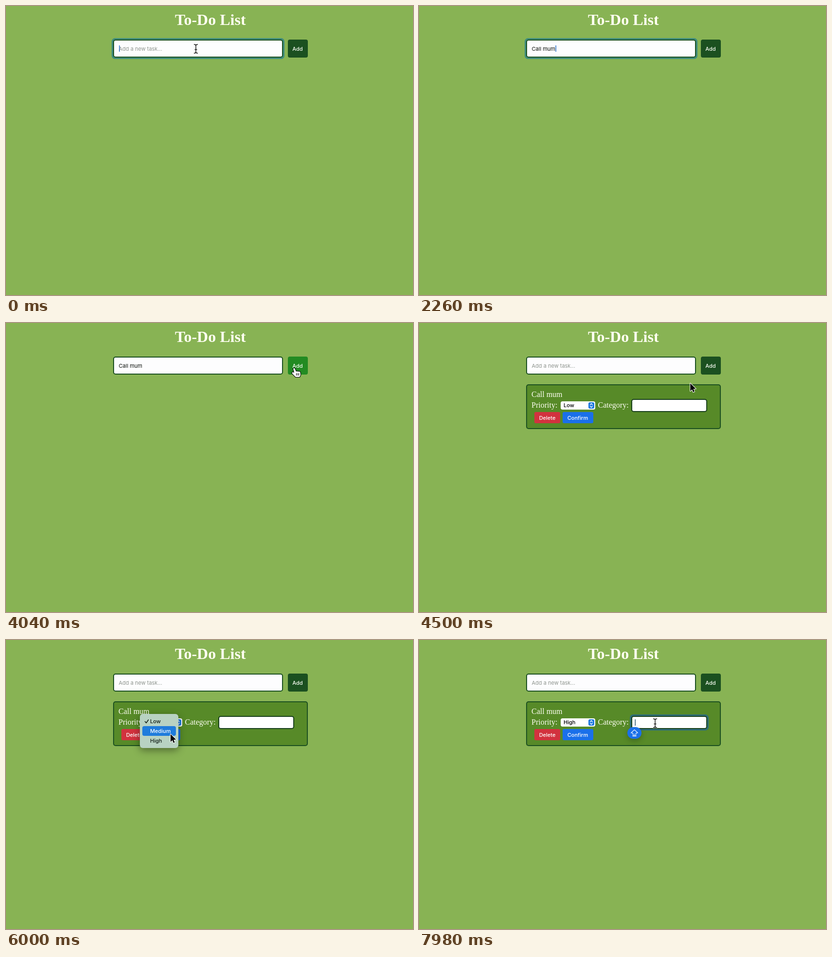
These frames come from a looping animation (836 by 594 pixels, 8 s). An HTML page with a canvas:

```html
<!DOCTYPE html>
<html lang="en">
<head>
<meta charset="utf-8">
<title>To-Do List</title>
<style>
  html, body { margin: 0; width: 100%; height: 100%; overflow: hidden; background: #88b354; }
  canvas { display: block; }
</style>
</head>
<body>
<canvas id="stage" width="836" height="594"></canvas>
<script>
const c = document.getElementById('stage').getContext('2d');
const LOOP = 8000;
const UI = '11px Inter, sans-serif', BOLDER = '500 ' + UI;
const SERIF = '16px "Liberation Serif", serif';
const DARK = '#1b5020', CREAM = '#fffff4', BLUE = '#1a70ea';

// Moments of the interaction, in ms
const KEYS = [820, 980, 1180, 1340, 1560, 1760, 1920, 2100];
const BLUR = 3960, ADDED = 4055, OPEN = 5400, PICK = 7360, FOCUS = 7800, BADGE = 7850;

// Pointer stops: time, x, y
const PATH = [
  [0, 390, 88], [2700, 390, 88], [3150, 547, 114.5], [3300, 547, 114.5],
  [3800, 592, 94], [4200, 592, 94], [4340, 585, 118], [5100, 345, 170],
  [5500, 345, 170], [5950, 338, 193.5], [6400, 338, 193.5], [6750, 335, 207],
  [7420, 335, 207], [7700, 485, 171], [LOOP, 485, 171]
];

function box(x, y, w, h, r, fill, border, line = 2) {
  c.beginPath();
  c.roundRect(x, y, w, h, r);
  c.fillStyle = border || fill;
  c.fill();
  if (border) box(x + line, y + line, w - 2 * line, h - 2 * line, Math.max(r - line, 1), fill);
}

function text(s, x, y, color, font = UI, align = 'left') {
  c.font = font;
  c.textAlign = align;
  c.fillStyle = color;
  c.fillText(s, x, y);
}

function draw(d, x, y, fill, stroke, width) {
  const p = new Path2D(d);
  c.save();
  c.translate(x, y);
  c.lineJoin = c.lineCap = 'round';
  if (stroke) { c.strokeStyle = stroke; c.lineWidth = width; c.stroke(p); }
  if (fill) { c.fillStyle = fill; c.fill(p); }
  c.restore();
}

function shadowed(blur, dy, alpha, paint) {
  c.save();
  c.shadowColor = `rgba(0,0,0,${alpha})`;
  c.shadowBlur = blur;
  c.shadowOffsetY = dy;
  paint();
  c.restore();
}

function pointer(t) {
  const i = PATH.findIndex(p => p[0] > t);
  const [t0, x0, y0] = PATH[i - 1], [t1, x1, y1] = PATH[i];
  const u = (t - t0) / (t1 - t0), e = u * u * (3 - 2 * u);
  return [x0 + (x1 - x0) * e, y0 + (y1 - y0) * e];
}

const inside = (x, y, l, top, r, b) => x > l && x < r && y > top && y < b;
const blink = age => Math.floor(age / 530) % 2 === 0;

function caret(x, y, color) {
  c.fillStyle = color;
  c.fillRect(x, y, 1.5, 13);
}

// Caps lock badge below the caret
function badge(x, y, age, left) {
  const s = Math.min(1, age / 90, left / 90);
  if (s <= 0) return;
  c.save();
  c.translate(x, y);
  c.scale(s, s);
  shadowed(12, 4, .25, () => box(-14.5, -12, 29, 24, 12, BLUE));
  draw('M0-6.5L7 0H3.5V3H-3.5V0H-7ZM-3.5 5.5H3.5V6.5H-3.5Z', 0, 0, null, '#eef5ff', 1.1);
  c.restore();
}

function drawForm(t, x, y) {
  text('To-Do List', 419.8, 39, '#fffff0', 'bold 32px "Liberation Serif", serif', 'center');
  const focused = t < BLUR;
  if (focused) box(217, 66, 355, 43, 7, '#3f8c7c');
  box(220, 69, 349, 37, 5, '#fdfdfe', DARK);

  const typed = t < ADDED ? KEYS.filter(k => k <= t).length : 0;
  const value = 'Call mum'.slice(0, typed);
  text(value || 'Add a new task...', 231.5, 92, value ? '#0a0f0a' : '#8f958f');
  if (focused && blink(t - (typed ? KEYS[typed - 1] : 0)))
    caret(232 + (typed ? c.measureText(value).width : .3), 81, '#2a70c8');

  const hover = inside(x, y, 579, 69, 620, 106);
  box(579, 69, 41, 37, 4, hover ? '#228b22' : DARK);
  text('Add', 599, 92, '#fafff5', BOLDER, 'center');
}

function drawCard(t) {
  box(220, 126, 400, 92, 5, '#578a28', DARK);
  text('Call mum', 231, 152, CREAM, SERIF);
  text('Priority:', 231, 174, CREAM, SERIF);
  text('Category:', 367.5, 174, CREAM, SERIF);

  box(291, 161, 71, 17, 4, '#fff');
  text(t < PICK ? 'Low' : 'High', 297, 173, '#000', BOLDER);
  box(348, 163, 12, 13, 3, '#1f7ae0');
  draw('M-2.2-1.5L0-4L2.2-1.5M-2.2 1.5L0 4L2.2 1.5', 354, 169.5, null, '#fff', 1.2);

  if (t >= FOCUS) box(433, 153, 162, 33, 7, '#2f6e78');
  box(436, 156, 156, 27, 5, '#fff', '#173f1b');
  if (t >= FOCUS) caret(443.5, 163, '#2c5570');

  box(237, 183, 53, 23, 3, '#d2323e');
  text('Delete', 263.5, 199, '#fff', BOLDER, 'center');
  box(295, 183, 63, 23, 3, BLUE);
  text('Confirm', 326, 199, '#fff', BOLDER, 'center');
}

function drawMenu(y) {
  shadowed(16, 5, .4, () => box(275, 152, 79, 70, 6, '#b8d2c2'));
  const active = y < 177 ? 0 : y < 197 ? 1 : 2;
  box(280, 157 + active * 20, 69, 20, 4, '#1f7cdc');
  ['Low', 'Medium', 'High'].forEach((s, i) =>
    text(s, 296, 171 + i * 20, i === active ? '#fff' : '#101c14', BOLDER));
  draw('M-3.5 0L-1 3L3.5-3.5', 289, 167.5, null, active ? '#101c14' : '#fff', 1.5);
}

function drawPointer(x, y, t, menu) {
  if (t > KEYS[0] && t < 2700) return;
  const beam = !menu && (inside(x, y, 220, 69, 569, 106) ||
    t >= ADDED && inside(x, y, 436, 156, 592, 183));
  if (beam) {
    const d = 'M-3.5-9Q0-9 0-6.5Q0-9 3.5-9M0-6.5V6.5M-2 1.5H2M-3.5 9Q0 9 0 6.5Q0 9 3.5 9';
    draw(d, x, y, null, '#fff', 3);
    draw(d, x, y, null, '#1c1c1c', 1.5);
  } else if (inside(x, y, 579, 69, 620, 106)) {
    draw('M-2 0Q-1-2 1-1L4 6Q6 4 7 6Q9 5 10 6Q12 5 12.5 8L13 13L11 17H3L-3 11Q-6 8-3 7L0 8Z',
      x, y, '#fff', '#000', 2.2);
    draw('M4.5 9.5V13.5M7 9.5V13.5M9.5 9.5V13.5', x, y, null, '#000', 1);
  } else {
    draw('M0 0V16L3.7 12.6L6 18L8.6 17L6.3 11.6L11.3 11.3Z', x, y, '#000', '#fff', 2);
  }
}

function frame(now) {
  const t = now % LOOP, [x, y] = pointer(t);
  const menu = t >= OPEN && t < PICK;
  c.fillStyle = '#88b354';
  c.fillRect(0, 0, 836, 594);
  drawForm(t, x, y);
  if (t >= ADDED) drawCard(t);
  if (menu) drawMenu(y);
  badge(231, 109, t - 150, KEYS[0] - t);
  badge(442.5, 191, t - BADGE, LOOP);
  drawPointer(x, y, t, menu);
}

const start = performance.now();
function tick() {
  frame(performance.now() - start);
  requestAnimationFrame(tick);
}
tick();
</script>
</body>
</html>
```
